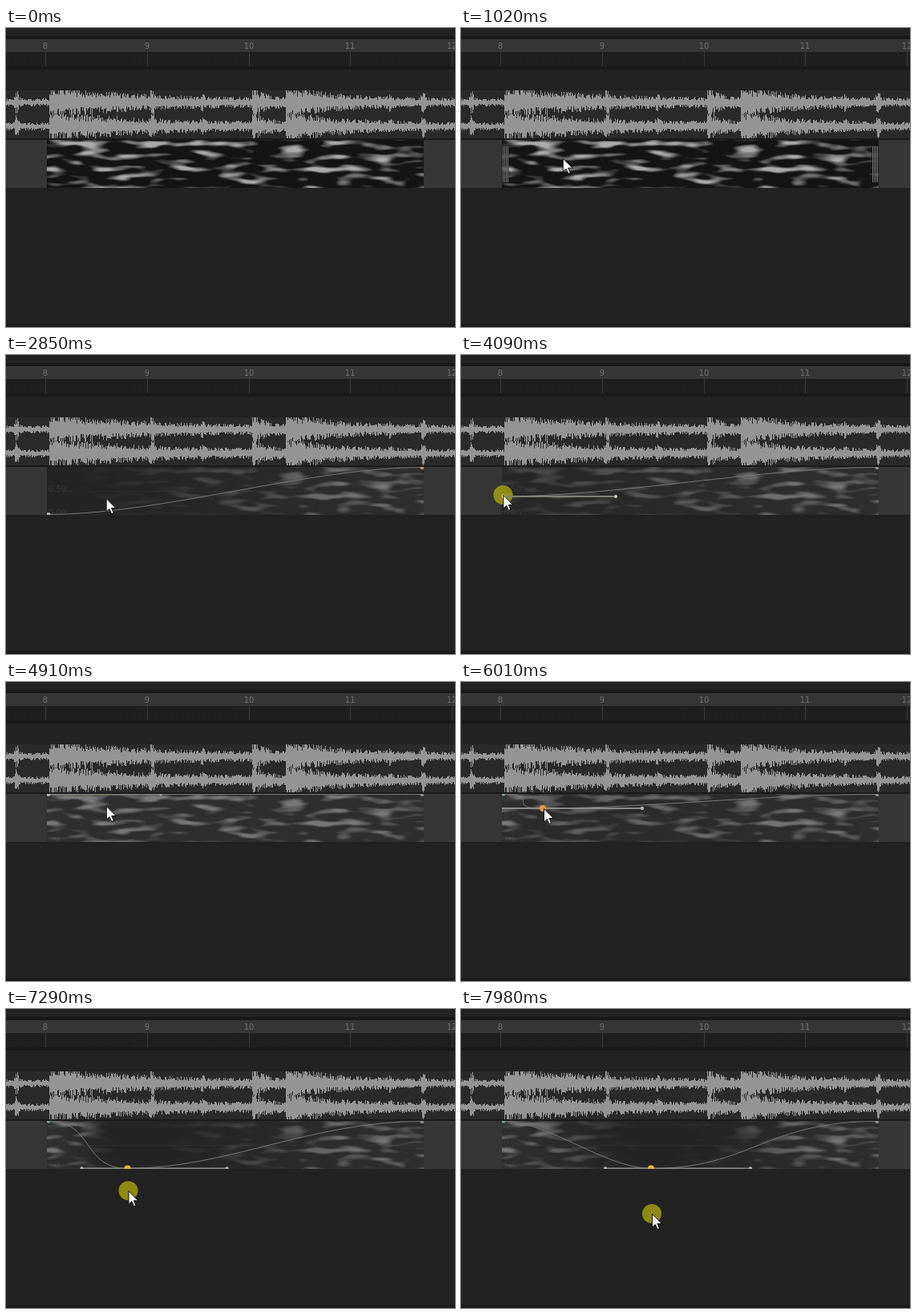
These frames come from a looping animation (560 by 374 pixels, 8 s). An HTML page with a canvas:

```html
<!DOCTYPE html>
<html lang="en">
<head>
<meta charset="utf-8">
<title>Automation editor</title>
<style>
  html, body { margin: 0; width: 100%; height: 100%; overflow: hidden; background: #222; }
  canvas { display: block; }
</style>
</head>
<body>
<canvas id="stage" width="560" height="374"></canvas>
<script>
const LOOP = 8000;
const FONT = '"DejaVu Sans", Verdana, sans-serif';
const CLIP = { x: 51, y: 140, w: 470, h: 60 };
const TOP = 140.5, BOTTOM = 199.5, LEFT = 53, RIGHT = 519;
const MENU_OPEN = 1290, MENU_CLOSE = 2300, GRAB_START = 3880, ADD_NODE = 5870;
const ctx = document.getElementById('stage').getContext('2d');

const clamp = (v, lo, hi) => Math.min(hi, Math.max(lo, v));
const within = (t, a, b) => t >= a && t < b;
const mix = (a, b, k) => a + (b - a) * k;

function randomizer(seed) {
  return () => (seed = (seed * 16807) % 2147483647) / 2147483647;
}

function layer(w, h, paint) {
  const canvas = document.createElement('canvas');
  canvas.width = w;
  canvas.height = h;
  paint(canvas.getContext('2d'));
  return canvas;
}

function rect(c, color, x, y, w, h) {
  c.fillStyle = color;
  c.fillRect(x, y, w, h);
}

function text(c, str, x, y, size, color, align = 'left') {
  c.font = `${size}px ${FONT}`;
  c.fillStyle = color;
  c.textAlign = align;
  c.fillText(str, x, y);
}

function dot(x, y, r, color) {
  ctx.fillStyle = color;
  ctx.beginPath();
  ctx.arc(x, y, r, 0, 7);
  ctx.fill();
}

// Audio level: decaying beats and short clicks over a quiet floor
const beat = (x, at, height, decay) => x < at ? 0 : height * Math.exp((at - x) / decay);
const click = (x, at, height) => height * Math.exp(-(((x - at) / 2.5) ** 2));

function loudness(x) {
  return 5 + beat(x, 54, 17, 110) + beat(x, 307, 16, 14) + beat(x, 349, 17, 60) +
    click(x, 13, 11) + click(x, 182, 9) + click(x, 245, 5) + click(x, 478, 5) + click(x, 520, 12);
}

const backdrop = layer(560, 374, c => {
  rect(c, '#222', 0, 0, 560, 374);
  rect(c, '#191919', 0, 10, 560, 4);
  rect(c, '#363636', 0, 14, 560, 16);
  rect(c, '#1f1f1f', 0, 30, 560, 18);
  rect(c, '#191919', 0, 48, 560, 4);
  rect(c, '#2a2a2a', 0, 78, 560, 60);
  rect(c, '#1b1b1b', 0, 138, 560, 2);
  rect(c, '#363636', 0, 140, 560, 60);
  rect(c, '#1c1b1b', 0, 370, 560, 4);
  for (let x = 1; x < 560; x += 126.75 / 32) rect(c, '#1d1d1d', Math.round(x), 31, 1, 17);
  for (let i = 0; i < 5; i++) {
    const x = Math.round(49 + i * 126.75);
    rect(c, '#3a3a3a', x, 30, 1, 18);
    text(c, String(8 + i), x, 26, 10, '#717171', 'center');
  }
  const random = randomizer(4711);
  for (let x = 0; x < 560; x++) {
    for (const mid of [93, 123]) {
      const reach = () => Math.min(15, Math.round(loudness(x) * mix(0.35, 1, random())));
      const up = reach(), down = reach();
      rect(c, '#949494', x, mid - up, 1, up + down);
    }
  }
});

function gradientNoise(seed) {
  const random = randomizer(seed);
  const angles = Array.from({ length: 1024 }, () => random() * Math.PI * 2);
  const fade = k => k * k * (3 - 2 * k);
  return (x, y) => {
    const ix = Math.floor(x), iy = Math.floor(y), fx = x - ix, fy = y - iy;
    const corner = (dx, dy) => {
      const angle = angles[(ix + dx + (iy + dy) * 37) & 1023];
      return Math.cos(angle) * (fx - dx) + Math.sin(angle) * (fy - dy);
    };
    return mix(mix(corner(0, 0), corner(1, 0), fade(fx)),
      mix(corner(0, 1), corner(1, 1), fade(fx)), fade(fy));
  };
}

const streaks = layer(CLIP.w, CLIP.h, c => {
  const noise = gradientNoise(2024);
  const image = c.createImageData(CLIP.w, CLIP.h);
  for (let y = 0; y < CLIP.h; y++) {
    for (let x = 0; x < CLIP.w; x++) {
      const n = noise(x / 36, y / 8) + 0.35 * noise(x / 18 + 9, y / 5 + 5);
      const v = 20 + 150 * clamp(n * 2.2, 0, 1);
      image.data.set([v, v, v, 255], (y * CLIP.w + x) * 4);
    }
  }
  c.putImageData(image, 0, 0);
});

// Pointer moves: start, end, x, y; it rests in between
const moves = [
  [470, 1090, 126, 160], [MENU_OPEN, 1550, 170, 185], [1800, 1820, 188, 191],
  [1820, 2100, 419, 191], [2570, 2850, 125, 179], [2850, 3270, 53, 196],
  [4020, 4500, 51, 119], [4770, 4910, 125, 155], [4910, 5190, 103, 158],
  [6410, 6880, 133, 194], [6880, 7150, 134, 221], [7220, 7980, 238, 256]
];

function pointerAt(t) {
  let x = 190, y = 374;
  for (const [start, end, toX, toY] of moves) {
    const k = clamp((t - start) / (end - start), 0, 1), eased = k * (2 - k);
    x = mix(x, toX, eased);
    y = mix(y, toY, eased);
  }
  return { x, y };
}

const pressed = t => within(t, GRAB_START, 4700) || within(t, 5600, 5740) ||
  within(t, ADD_NODE, 6010) || t >= 6410;

// Curve nodes with horizontal handle lengths before and after
function curveNodes(t) {
  const lift = pointerAt(clamp(t, 4020, 4500)).y;
  const start = { x: LEFT, y: t < 4020 ? BOTTOM : clamp(lift + 2, TOP, BOTTOM), out: 140 };
  const end = { x: RIGHT, y: TOP, in: 140 };
  if (t < ADD_NODE) return [start, end];
  const { x, y } = pointerAt(t);
  start.out = 57;
  return [start, { x: x - 1, y: clamp(y, TOP, BOTTOM), in: 57, out: 124 }, end];
}

function segments(nodes) {
  return nodes.slice(1).map((b, i) => {
    const a = nodes[i], span = b.x - a.x;
    return { a, b, x1: a.x + Math.min(a.out, span), x2: b.x - Math.min(b.in, span) };
  });
}

const bezier = (p0, p1, p2, p3, k) => {
  const m = 1 - k;
  return m * m * m * p0 + 3 * m * m * k * p1 + 3 * m * k * k * p2 + k * k * k * p3;
};

function curveY(parts, x) {
  const { a, b, x1, x2 } = parts.find(p => x <= p.b.x) || parts[parts.length - 1];
  let lo = 0, hi = 1;
  for (let i = 0; i < 12; i++) {
    const mid = (lo + hi) / 2;
    if (bezier(a.x, x1, x2, b.x, mid) < x) lo = mid; else hi = mid;
  }
  return bezier(a.y, a.y, b.y, b.y, lo);
}

function clipped(paint) {
  ctx.save();
  ctx.beginPath();
  ctx.rect(CLIP.x, CLIP.y, CLIP.w, CLIP.h);
  ctx.clip();
  paint();
  ctx.restore();
}

function drawCurve(nodes) {
  const parts = segments(nodes);
  for (let x = CLIP.x; x < CLIP.x + CLIP.w; x++) {
    const dim = (curveY(parts, x) - TOP) / (BOTTOM - TOP);
    rect(ctx, `rgba(0,0,0,${dim})`, x, CLIP.y, 1, CLIP.h);
  }
  rect(ctx, 'rgba(72,72,72,.5)', CLIP.x, CLIP.y, CLIP.w, CLIP.h);
  rect(ctx, 'rgba(64,64,64,.35)', 78, 170, 443, 1);
  text(ctx, '0.50', 53, 171, 10, '#3a3a3a');
  text(ctx, '0.00', 53, 201, 10, '#3a3a3a');

  ctx.strokeStyle = '#777';
  ctx.lineWidth = 1;
  ctx.beginPath();
  ctx.moveTo(nodes[0].x, nodes[0].y);
  for (const { a, b, x1, x2 } of parts) ctx.bezierCurveTo(x1, a.y, x2, b.y, b.x, b.y);
  ctx.stroke();
}

function drawHandle(x1, x2, y, color) {
  rect(ctx, color, x1, y - 1, x2 - x1, 2);
}

function drawNodes(t, nodes) {
  const first = nodes[0], added = nodes.length === 3 ? nodes[1] : null;
  const held = pressed(t), grabbed = t >= GRAB_START;
  if (added) {
    const from = added.x - added.in, to = added.x + added.out;
    drawHandle(from, to, added.y, '#8a8a8a');
    dot(from, added.y, 2.2, '#b0b0b0');
    dot(to, added.y, 2.2, '#b0b0b0');
    dot(first.x, first.y, 2.2, '#78a0a0');
    dot(added.x, added.y, 4, held ? '#e8b43c' : '#e09a40');
  } else {
    if (grabbed) {
      drawHandle(first.x, first.x + first.out, first.y, '#858578');
      dot(first.x + first.out, first.y, 2, held ? '#d6d6b0' : '#999');
    }
    dot(first.x, first.y, 2.5, held ? '#d8cc74' : '#b4b4b4');
  }
  dot(RIGHT, TOP, 2.6, grabbed ? '#888' : '#c88c60');
}

function drawGrips() {
  for (const x of [51, 512]) {
    rect(ctx, 'rgba(20,20,20,.6)', x, 148, 9, 46);
    for (let i = 0; i < 4; i++) rect(ctx, '#777', x + 1 + i * 2, 148, 1, 45);
  }
}

function drawPanel(x, y, w, h) {
  rect(ctx, '#303030', x, y, w, h);
  rect(ctx, '#222', x + 1, y + 1, w - 2, h - 2);
}

const options = ['Brightness', 'Color', 'Background Color', 'Balance', 'Contrast',
  'Scale', 'Speed', 'ID Offset'];

function drawMenu(t) {
  const size = 13.13, light = '#d6d6d6', dark = '#362a1e', orange = '#ff922e';
  const editing = t >= 1420;
  drawPanel(126, 160, 204, 46);
  if (editing) rect(ctx, orange, 127, 184, 202, 19);
  text(ctx, 'Clear automation editor', 150, 178, size, light);
  text(ctx, 'Edit...', 150, 199, size, editing ? dark : light);
  ctx.fillStyle = editing ? '#222' : light;
  ctx.beginPath();
  ctx.moveTo(322, 189);
  ctx.lineTo(327, 193.5);
  ctx.lineTo(322, 198);
  ctx.fill();
  if (t < 1520) return;
  drawPanel(330, 181, 164, 172);
  const active = t >= 1900;
  if (active) rect(ctx, orange, 331, 184, 162, 20);
  options.forEach((name, i) =>
    text(ctx, name, 354, 199 + i * 21, size, active && i === 0 ? dark : light));
}

const arrow = new Path2D('M0 0V16.5L3.8 13L6.5 19L9 18L6.4 12H11.7Z');

function drawArrow({ x, y }) {
  ctx.save();
  ctx.translate(x + 0.5, y + 0.5);
  ctx.fillStyle = '#fff';
  ctx.strokeStyle = '#111';
  ctx.lineWidth = 1;
  ctx.fill(arrow);
  ctx.stroke(arrow);
  ctx.restore();
}

function draw(t) {
  const pointer = pointerAt(t), nodes = curveNodes(t), editor = t >= MENU_CLOSE;
  ctx.drawImage(backdrop, 0, 0);
  ctx.drawImage(streaks, CLIP.x, CLIP.y);
  if (editor) clipped(() => drawCurve(nodes));
  if (within(t, 900, MENU_CLOSE)) drawGrips();
  if (within(t, MENU_OPEN, MENU_CLOSE)) drawMenu(t);
  if (pressed(t)) dot(pointer.x, pointer.y, 12, 'rgba(170,165,14,.8)');
  if (editor) clipped(() => drawNodes(t, nodes));
  if (t >= 470) drawArrow(pointer);
}

const began = performance.now();
function tick() {
  draw((performance.now() - began) % LOOP);
  requestAnimationFrame(tick);
}
tick();
</script>
</body>
</html>
```
